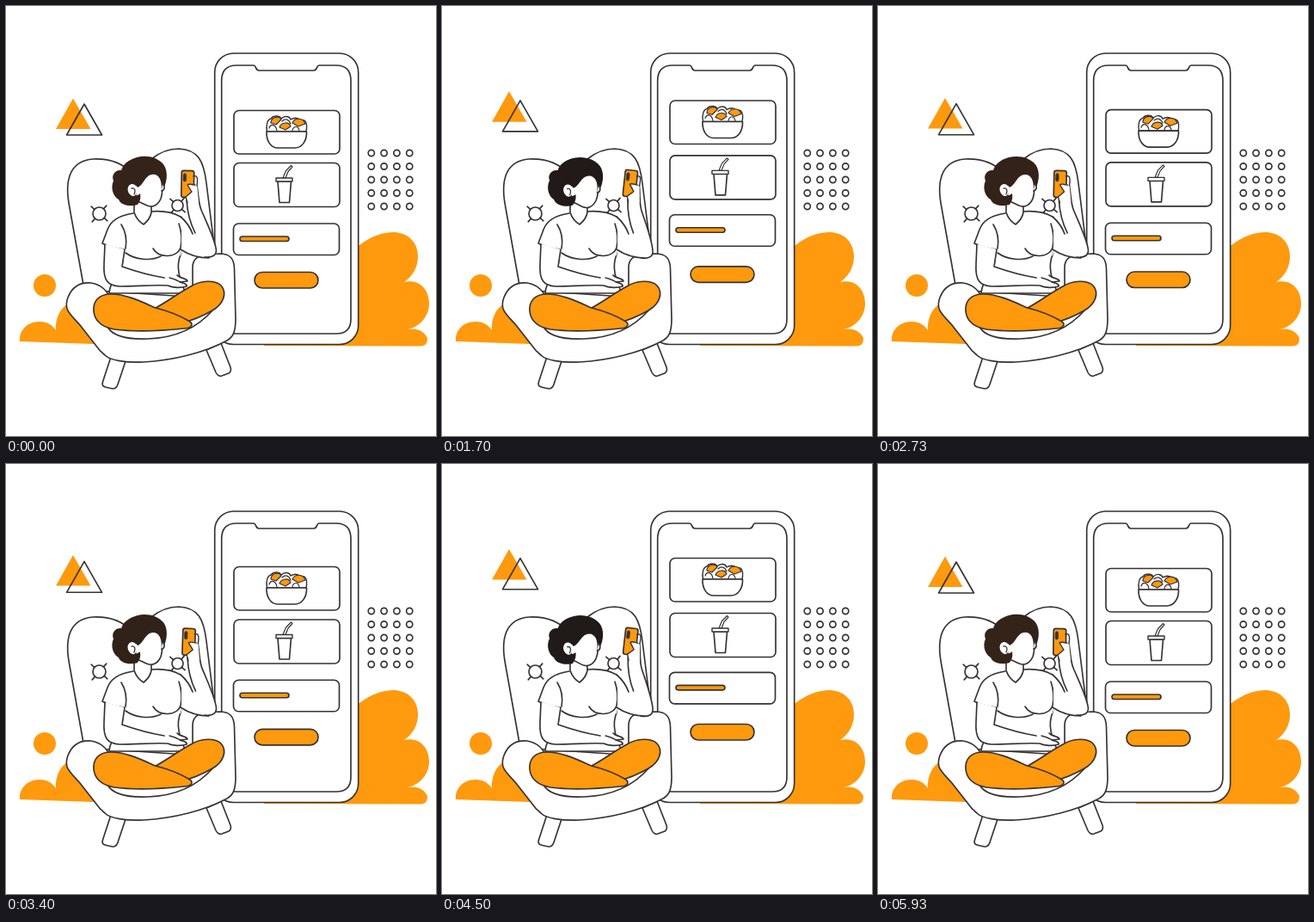
Write an HTML page with a canvas that moves like this. It is 500 px wide and 500 px high and loops after 6010 ms.

```html
<!DOCTYPE html>
<html lang="en">
<head>
<meta charset="utf-8">
<title>Ordering food from an armchair</title>
<style>
html, body { margin: 0; width: 100%; height: 100%; overflow: hidden; background: #fff; }
canvas { display: block; width: 100vw; height: 100vh; }
</style>
</head>
<body>
<canvas id="stage"></canvas>
<script>
const LOOP = 6010;
const ORANGE = '#ff990d';
const INK = '#353233';
const WHITE = '#fff';
const LINE = 1.65;
const canvas = document.getElementById('stage');
const ctx = canvas.getContext('2d');
const cache = {};

function resize() {
  const ratio = window.devicePixelRatio || 1;
  canvas.width = Math.round(innerWidth * ratio);
  canvas.height = Math.round(innerHeight * ratio);
}

function draw(d, fill, stroke = INK, width = LINE) {
  const path = cache[d] || (cache[d] = new Path2D(d));
  paint(path, fill, stroke, width);
}

function paint(path, fill, stroke, width) {
  if (fill) { ctx.fillStyle = fill; ctx.fill(path); }
  if (stroke) { ctx.strokeStyle = stroke; ctx.lineWidth = width; ctx.stroke(path); }
}

function box(x, y, w, h, r, fill, width = LINE) {
  const path = new Path2D();
  path.roundRect(x, y, w, h, r);
  paint(path, fill, INK, width);
}

function disc(x, y, r, fill, stroke = INK, width = LINE) {
  const path = new Path2D();
  path.arc(x, y, r, 0, Math.PI * 2);
  paint(path, fill, stroke, width);
}

function moved(dy, part) {
  ctx.save();
  ctx.translate(0, dy);
  part();
  ctx.restore();
}

function turned(x, y, degrees, part) {
  ctx.save();
  ctx.translate(x, y);
  ctx.rotate(degrees * Math.PI / 180);
  ctx.translate(-x, -y);
  part();
  ctx.restore();
}

function scenery() {
  draw('M300 395V330L411 278C424 268 438 263 451 263C470 264 479 277 479 291C479 304 473 314 463 321C479 317 492 328 492 346C492 361 481 373 467 376C478 374 486 378 490 386C490 392 488 395.5 482 395.5Z', ORANGE, null);
  draw('M16 390C15 378 24 367 39 367C48 367 54 371 58 377C57 365 62 351 73 346L130 394Z', ORANGE, null);
  disc(45, 325, 13, ORANGE, null);
  for (let row = 0; row < 5; row++)
    for (let col = 0; col < 4; col++)
      disc(424.8 + col * 14.8, 171 + row * 15.5, 3.6, WHITE);
}

function triangles(lift) {
  moved(-8.5 * lift, () => draw('M78 107.5L98.5 143H58Z', ORANGE, null));
  moved(-4.3 * lift, () => draw('M91 114L111.5 150H70.5Z', null));
}

function bowl() {
  draw('M303.5 146C302 138 304 132 308 131C311 127 318 127 320 131C324 127 330 128 331 132C336 129 341 130 342 134C348 130 351 136 349 146Z', WHITE, INK, 1.4);
  draw('M308 136C308 129 318 127 320 132L314 138Z', ORANGE, INK, 1.2);
  draw('M318 141C320 135 329 134 331 140L325 144Z', ORANGE, INK, 1.2);
  draw('M333 136C336 129 346 130 348 137L340 140Z', ORANGE, INK, 1.2);
  draw('M306 142C308 136 314 138 315 145M321 134C325 130 329 132 331 137M333 145C334 139 340 139 341 145', null, INK, 1.2);
  draw('M303 146H349.5C350 157 344 165 336 165H316C308 165 302.5 157 303 146Z', WHITE);
}

function cup() {
  draw('M322 200L325.5 191.5L331.5 185.5L333 187L328 192.5L325 200Z', WHITE, INK, 1.2);
  draw('M316 204H331.5L329.5 228.5H318Z', WHITE);
  draw('M314 200H333V204H314Z', WHITE, INK, 1.4);
}

function bigPhone(lift) {
  box(242.7, 55, 167, 338.5, 22, WHITE);
  draw('M268 69H288C291 69 290 75 294 75H358C362 75 361 69 364 69H384Q401 69 401 87V364Q401 381 384 381H268Q250.7 381 250.7 364V87Q250.7 69 268 69Z', WHITE);
  moved(-12 * lift, () => { box(265, 121.5, 123, 50.5, 6, WHITE); bowl(); });
  moved(-9 * lift, () => { box(265, 182.5, 123, 51, 6, WHITE); cup(); });
  moved(-10.7 * lift, () => {
    box(264.5, 253, 123, 36.5, 6, WHITE);
    box(272, 268, 57, 5.5, 2.75, ORANGE);
  });
  moved(-7 * lift, () => box(289, 309.5, 74, 18.5, 9.2, ORANGE));
}

function tuft(x, y, r) {
  disc(x, y, r, WHITE);
  for (let i = 0; i < 4; i++) {
    const a = Math.PI * (i / 2 + 0.23);
    const c = Math.cos(a), s = Math.sin(a);
    draw(`M${x + c * r} ${y + s * r}L${x + c * (r + 5)} ${y + s * (r + 5)}`, null);
  }
}

function chairBack() {
  draw('M122 408L112.5 437C111 442 114 443 117 443.5L124 445C128 445 129 443 130 440L139 413Z', WHITE);
  draw('M233 400L244 426C246 430 248 431 251 430L259 427C262 425 262 423 261 420L250 392Z', WHITE);
  draw('M91 330L73 229C68 198 77 180 101 178C122 177 137 184 147 195L169 178C180 169 190 166 201 166C224 167 230 181 233 206L241 270L240 340Z', WHITE);
  tuft(108.5, 241.5, 7.5);
  tuft(199.5, 232, 6.5);
}

function torso() {
  draw('M139 270L135 302C132 315 120 321 120 334H209C202 318 197 304 203 289L204 266Z', WHITE);
  draw('M148 241C130 244 122 250 118 260L112 276C119 280 128 282 137 283L138 296L203 290L204 284L213 264C209 250 203 242 190 240L169 238Z', WHITE, null);
  draw('M148 241C130 244 122 250 118 260L112 276C119 280 128 282 137 283', null);
  draw('M134 254C139 262 141 271 139 282M139 287C150 295 168 297 180 291M171 282C178 294 199 293 203 281C205 272 204 262 201 253', null);
  draw('M149 218L149 240L160 254L169 240V225Z', WHITE, null);
  draw('M149 226L149 240C151 246 155 251 160 254C165 250 168 246 169 240V231M169 239C181 238 194 240 203 245', null);
}

function chairSeat() {
  draw('M72 339C77 326 87 321 99 322C111 324 119 332 123 344C136 366 184 370 217 332V304C217 294 223 290 233 289L248 288C260 288 265 293 265.5 305L267 364C267 379 264 385 257 389C231 403 195 412 160 414C139 415 121 412 115 406C111 403 108 400 104 394L86 371C79 363 73 358 71 352C70 348 70 344 72 339Z', WHITE);
  draw('M118 373C124 384 140 388 165 387C197 386 222 375 241 353', null);
}

function leftArm() {
  draw('M115 277L114 300C113 319 118 325 132 326C151 326 172 324 188 325C194 328 204 328 210 326C211 323 206 322 202 321L211 320C210 316 202 317 199 313C193 312 188 314 184 316C166 313 149 308 135 303L138 283Z', WHITE, null);
  draw('M115 277L114 300C113 319 118 325 132 326C151 326 172 324 188 325C194 328 204 328 210 326C211 323 206 322 202 321L211 320C210 316 202 317 199 313M184 316C166 313 149 308 135 303L138 283', null);
  draw('M190 316C195 317 199 319 203 321', null, INK, 1.3);
}

function legs() {
  draw('M174 351C189 343 200 334 215 326C226 319 243 318 250 325C257 333 254 346 240 354C228 361 215 366 203 369Z', ORANGE);
  draw('M102 355C101 343 108 335 122 335C140 335 158 344 174 351C190 355 204 361 214 367C219 371 214 375 207 375C178 378 149 379 126 376C110 373 103 365 102 355Z', ORANGE);
}

function rightArm(lift) {
  draw('M204 246C212 254 221 263 225 270L244 283C247 289 242 292 235 292C222 292 210 287 204 284Z', WHITE, null);
  draw('M203 283C212 289 223 293 236 293', null);
  turned(222, 292, 5.4 * lift, () => {
    draw('M226 290C238 293 246 290 244 281C241 267 232 249 227 237C224 230 223 221 222 213L210 223L211 235C213 247 216 256 220 267Z', WHITE, null);
    draw('M231 292C241 293 246 289 244 281C241 267 232 249 227 237C224 230 224 221 222 209M210 226C211 242 215 254 220 264', null);
    turned(211, 207, 1, () => {
      box(204, 191.5, 14.5, 31, 2.5, ORANGE);
      box(206, 195, 3.4, 9, 1.6, INK, 0.6);
    });
    draw('M222 207C217 208 213 206 211 208L216 216L209 222L212 228H224Z', WHITE, null);
    draw('M220 208C216 208 213 206 211 208L216 216L209 222L211 229M218 198C223 196 223 202 222 209', null, INK, 1.4);
  });
  draw('M203 245C210 251 214 257 217 265', null);
}

function head(lift) {
  const tone = [52 - 20 * lift, 35 - 9 * lift, 25].map(Math.round);
  turned(132, 205, 2.5 * lift, () => {
    draw('M150 207C154 192 168 187 177 194C182 202 183 215 180 224C177 231 171 235 164 232L151 226Z', WHITE);
    draw('M184 211C188 201 188 191 183 184C176 176 164 173 152 176C142 179 136 184 134 191C127 190 122 197 125 203C121 212 125 222 131 225C133 231 143 234 153 231C156 227 157 223 156 218C149 224 142 218 142 212C145 206 151 207 153 211C158 209 160 203 164 199C169 194 176 195 179 201Z', `rgb(${tone})`, null);
    draw('M144 219C140 215 141 208 146 207C151 207 154 212 152 217C150 222 147 222 144 219Z', WHITE, null);
    draw('M146 212C150 211 151 215 149 219', null, INK, 1.3);
    draw('M182 207C185 209 185 214 181 215', WHITE);
  });
}

function render(time) {
  const t = time % LOOP;
  // Twenty poses a second, held alternately for 30 and 70 ms.
  const step = Math.min(119, 2 * Math.floor(t / 100) + (t % 100 >= 30 ? 1 : 0));
  const lift = (1 - Math.cos(step / 60 * Math.PI * 2)) / 2;

  ctx.setTransform(canvas.width / 500, 0, 0, canvas.height / 500, 0, 0);
  ctx.fillStyle = WHITE;
  ctx.fillRect(0, 0, 500, 500);
  ctx.lineCap = ctx.lineJoin = 'round';

  scenery();
  triangles(lift);
  bigPhone(lift);
  chairBack();
  torso();
  chairSeat();
  legs();
  leftArm();
  rightArm(lift);
  head(lift);
}

addEventListener('resize', resize);
resize();
const start = performance.now();
function tick() {
  render(performance.now() - start);
  requestAnimationFrame(tick);
}
tick();
</script>
</body>
</html>
```
